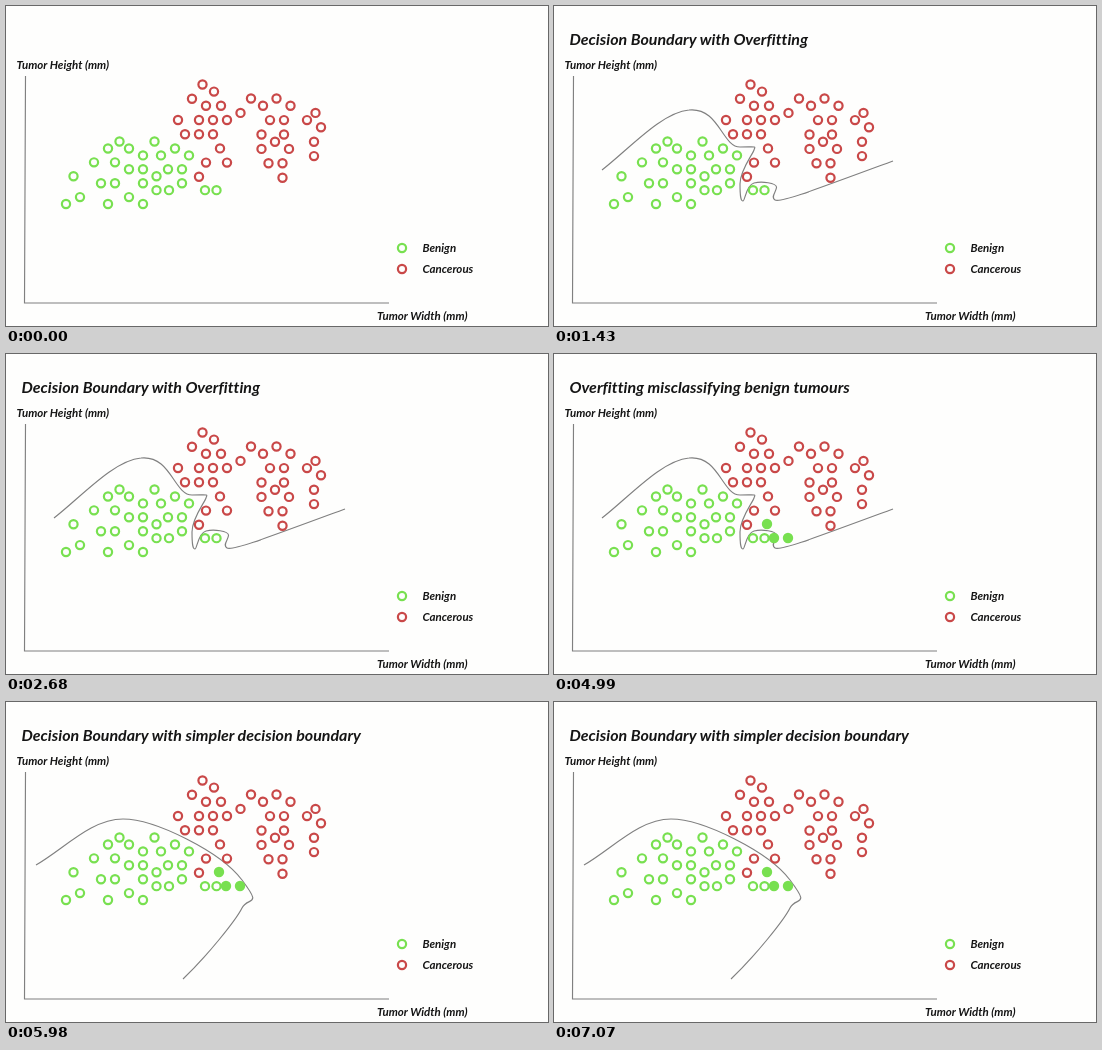
Write an HTML page that moves like this. It is 542 px wide and 320 px high and loops after 7.8 s.

```html
<!DOCTYPE html>
<html lang="en">
<head>
<meta charset="utf-8">
<title>Decision boundaries</title>
<style>
  html, body { margin: 0; width: 100%; height: 100%; overflow: hidden; background: #fefefd; }
  svg { display: block; width: 100%; height: 100%; }
  text { font: italic 700 11.5px Lato, sans-serif; font-variant-ligatures: none; fill: #151515; }
  #title { font-size: 16px; }
  path { fill: none; stroke: #808080; stroke-width: 1.15; }
  circle { fill: none; stroke-width: 2.2; }
  .benign { stroke: #78e050; }
  .cancer { stroke: #c94848; }
  .solid { fill: #78e050; }
</style>
</head>
<body>
<svg viewBox="0 0 542 320">
  <path d="M19.5 70L18.5 297H383"/>
  <path id="curve"/>
  <g id="dots"></g>
  <g id="extra"></g>
  <text id="title" x="15.5" y="38.5"></text>
  <text x="10.5" y="63">Tumor Height (mm)</text>
  <text x="371" y="313.5">Tumor Width (mm)</text>
  <text x="416.5" y="246">Benign</text>
  <text x="416.5" y="267">Cancerous</text>
</svg>
<script>
const $ = id => document.getElementById(id);

const dot = (x, y, kind) => `<circle class="${kind}" cx="${x}" cy="${y}" r="4.1"/>`;

// Dots sit on evenly spaced rows; each row lists its x positions.
const cluster = (kind, top, pitch, rows) =>
  rows.map((row, i) => row.map(x => dot(x, top + i * pitch, kind)).join("")).join("");

$("dots").innerHTML =
  cluster("benign", 135.5, 6.95, [
    [113.5, 148.5], [102, 123, 169], [137, 155, 183], [88, 109], [123, 137, 162, 176],
    [67.5, 150.5], [95, 109, 137, 176], [150.5, 163, 199, 210.5], [74, 123], [60, 102, 137]]) +
  cluster("cancer", 78.5, 7.1, [
    [196.5], [208], [186], [200, 215], [234.5], [172, 193, 207, 221], [], [179, 193, 207],
    [], [214], [], [200, 221], [], [193]]) +
  cluster("cancer", 92.5, 7.2, [
    [245, 270.5], [257, 284.5], [309.5], [264, 278, 301], [315], [255.5, 278], [269, 308],
    [255.5, 283], [308], [262.5, 276.5], [], [276.5]]) +
  dot(396, 242, "benign") + dot(396, 263, "cancer");
$("extra").innerHTML = cluster("benign solid", 170, 14, [[213], [220, 234]]);

const wiggly = "M48 164C74 144 108 106 135 104C165 101 168 141 186 141S201 140 200 144" +
  "S186 164 186 178S187 195 189 195S192 179 200 177S222 177 222.5 181S216 191 221 194S255 186 339 155";
const smooth = "M30 163C58 147 85 117 117 117S215 150 236 178S242 194 236 206S202 253 177 277";

const scenes = [
  { end: 1430, title: "", curve: "", extra: false },
  { end: 3510, title: "Decision Boundary with Overfitting", curve: wiggly, extra: false },
  { end: 5980, title: "Overfitting misclassifying benign tumours", curve: wiggly, extra: true },
  { end: 7800, title: "Decision Boundary with simpler decision boundary", curve: smooth, extra: true }
];

const start = performance.now();
let shown;
function draw() {
  const t = (performance.now() - start) % 7800;
  const scene = scenes.find(s => t < s.end);
  if (scene !== shown) {
    shown = scene;
    $("title").textContent = scene.title;
    $("curve").setAttribute("d", scene.curve);
    $("extra").style.display = scene.extra ? "" : "none";
  }
  requestAnimationFrame(draw);
}
draw();
</script>
</body>
</html>
```
